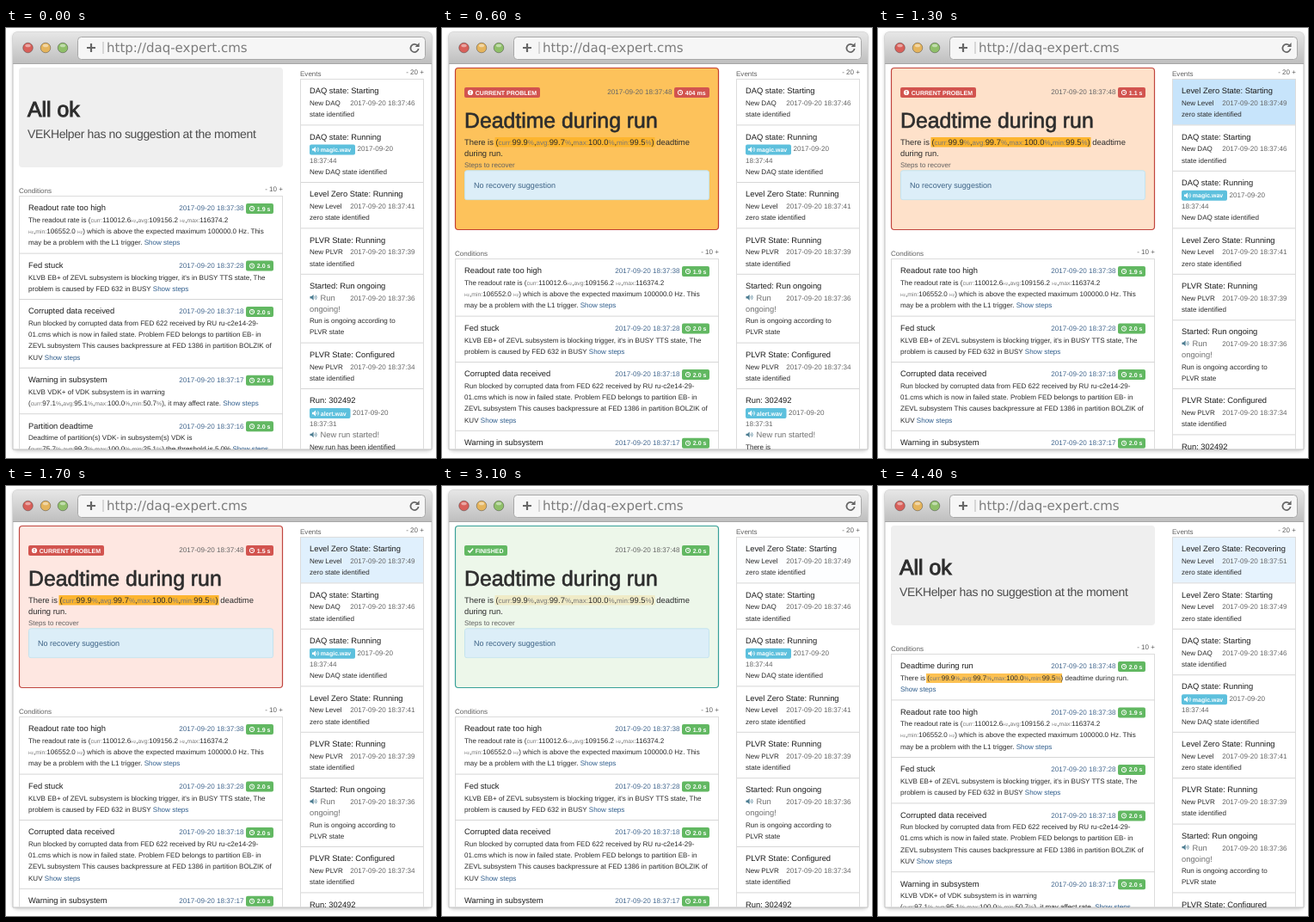
These frames come from a looping animation (500x500 px, 4.5 s). An HTML page:

```html
<!DOCTYPE html>
<html lang="en">
<head>
<meta charset="utf-8">
<title>Run monitor</title>
<style>
html, body { margin: 0; width: 100%; height: 100%; overflow: hidden; background: #fff; }
svg { display: block; width: 500px; height: 500px; }
text { font-family: "Liberation Sans", Arial, sans-serif; text-rendering: geometricPrecision; white-space: pre; }
.title { font-size: 9.35px; fill: #1c1c1c; }
.body { font-size: 8.05px; fill: #2a2a2a; }
.lead { font-size: 9.4px; fill: #2a2a2a; }
.note { font-size: 8.05px; fill: #606060; }
.sound { font-size: 9.35px; fill: #707070; }
.date { font-size: 8.1px; fill: #666; }
.blue { fill: #44688f; }
.label { font-size: 7px; font-weight: bold; fill: #fff; }
.heading { font-size: 24.8px; fill: #2d2d2d; stroke: #2d2d2d; stroke-width: .65px; }
.strong { stroke-width: 1px; }
.thin { font-size: 14px; letter-spacing: -.36px; fill: #4c4c4c; }
.hint { font-size: 9.05px; fill: #3c6285; }
.url { font: 15px "DejaVu Sans", sans-serif; fill: #7c7c7c; }
.unit { font-size: .85em; fill: #777; }
.hertz { font-size: .62em; fill: #777; }
.link { fill: #2f5d8c; }

/* One 4.5 s cycle: alarm 0.2 s, values 0.6 s, event 1.1 s, finished 2.2 s, event 3.5 s, calm 4.2 s */
.calm, .alarm, .early, .late, .running, .finished, .conditions, .extra, .rows, .details, .events, .before, .after {
  animation: 4.5s step-end infinite;
}
.calm { animation-name: calm; }
.alarm { animation-name: alarm; }
.early, .before { animation-name: early; }
.late, .after { animation-name: late; }
.running { animation-name: running; }
.finished { animation-name: finished; }
.conditions { animation-name: conditions; }
.extra { animation-name: extra; }
.rows { animation-name: rows; }
.details { animation-name: details; }
.events { animation-name: events; }
.panel { animation: tint 4.5s linear infinite, grow 4.5s step-end infinite; }
.mark-panel { animation: markPanel 4.5s linear infinite; }
.mark-row { animation: markRow 4.5s linear infinite; }
.glow1 { animation: glow1 4.5s linear infinite; }
.glow2 { animation: glow2 4.5s linear infinite; }
@keyframes calm { 0% { opacity: 1 } 4.444% { opacity: 0 } 93.333%, 100% { opacity: 1 } }
@keyframes alarm { 0% { opacity: 0 } 4.444% { opacity: 1 } 93.333%, 100% { opacity: 0 } }
@keyframes early { 0% { opacity: 1 } 13.333%, 100% { opacity: 0 } }
@keyframes late { 0% { opacity: 0 } 13.333%, 100% { opacity: 1 } }
@keyframes running { 0% { opacity: 1 } 48.888%, 100% { opacity: 0 } }
@keyframes finished { 0% { opacity: 0 } 48.888%, 100% { opacity: 1 } }
@keyframes conditions {
  0% { transform: translateY(0) } 4.444% { transform: translateY(60px) }
  13.333% { transform: translateY(73px) } 93.333%, 100% { transform: translateY(0) }
}
@keyframes extra { 0% { opacity: 0 } 93.333%, 100% { opacity: 1 } }
@keyframes rows { 0% { transform: translateY(0) } 93.333%, 100% { transform: translateY(53.4px) } }
@keyframes details { 0% { transform: translateY(0) } 13.333%, 100% { transform: translateY(13.3px) } }
@keyframes events {
  0% { transform: translateY(0) } 24.444% { transform: translateY(53.4px) }
  77.777%, 100% { transform: translateY(106.8px) }
}
@keyframes grow { 0% { height: 175px } 13.333%, 100% { height: 188px } }
@keyframes tint {
  0%, 6.667% { fill: #fdb52b; stroke: #c43c2c }
  32.2%, 48.88% { fill: #fee7e1; stroke: #c0453f }
  48.888%, 100% { fill: #edf7ea; stroke: #38a098 }
}
@keyframes markPanel { 0%, 48.888% { opacity: 1 } 53.333% { opacity: .88 } 73%, 100% { opacity: 0 } }
@keyframes markRow { 0%, 93.333% { opacity: 1 } 97.778% { opacity: .83 } 100% { opacity: .75 } }
@keyframes glow1 { 0%, 24.444% { opacity: 1 } 37.778% { opacity: .46 } 53.333% { opacity: .18 } 73%, 100% { opacity: 0 } }
@keyframes glow2 { 0%, 77.777% { opacity: 1 } 84.444% { opacity: .7 } 97.778% { opacity: .37 } 100% { opacity: .34 } }
</style>
</head>
<body>
<svg id="stage" viewBox="0 0 500 500"></svg>
<script>
const RED = '#d2544f', GREEN = '#62b862', CYAN = '#5dc0dd';

// Inline markup: ~unit~, ^hertz^ and [link]
const span = cls => `<tspan class="${cls}">$1</tspan>`;
const rich = s => s.replace(/~(.+?)~/g, span('unit')).replace(/\^(.+?)\^/g, span('hertz')).replace(/\[(.+?)\]/g, span('link'));
const text = (x, y, s, cls = 'body', more = '') => `<text x="${x}" y="${y}" class="${cls}" ${more}>${rich(s)}</text>`;
const rect = (x, y, w, h, fill, more = '') => `<rect x="${x}" y="${y}" width="${w}" height="${h}" fill="${fill}" ${more}/>`;
const group = (cls, ...parts) => `<g class="${cls}">${parts.join('')}</g>`;
const line = (x1, x2, y) => rect(x1, y, x2 - x1, 1, '#d6d6d6');
const stats = (...v) => '(' + ['curr', 'avg', 'max', 'min'].map((k, i) => `~${k}:~${v[i]}~%~`).join(',') + ')';
const rowHeight = lines => 27 + 13.2 * lines;

const icons = {
  clock: (x, y) => `<circle cx="${x}" cy="${y}" r="2.7" fill="none" stroke="#fff"/><path d="M${x} ${y - 1.6}v1.8h1.3" fill="none" stroke="#fff" stroke-width=".8"/>`,
  alert: (x, y) => `<circle cx="${x}" cy="${y}" r="3.1" fill="#fff"/>` + rect(x - .5, y - 2, 1, 2.4, RED) + rect(x - .5, y + .9, 1, 1, RED),
  check: (x, y) => `<path d="M${x - 2.7} ${y}l2 2.1 3.8-4.3" fill="none" stroke="#fff" stroke-width="1.6"/>`,
  speaker: (x, y, color = '#fff') => `<path d="M${x - 4} ${y - 1.2}h1.7l2.4-2.2v6.8l-2.4-2.2h-1.7z" fill="${color}"/>
    <path d="M${x + 1.3} ${y - 1.3}q1.2 1.3 0 2.6M${x + 2.6} ${y - 2.6}q2.4 2.6 0 5.2" fill="none" stroke="${color}" stroke-width=".8"/>`
};

// base is the text baseline the badge sits on
const badge = (x, base, w, color, icon, label) =>
  rect(x, base - 8.4, w, 12, color, 'rx="2"') + icons[icon](x + 7, base - 2.4) + text(x + 12.8, base + .1, label, 'label');

function stamp(base, time, label, color, cls = 'date') {
  const w = label.length > 5 ? 41 : 32;
  return text(308.4 - w, base, '2017-09-20 18:37:' + time, cls, 'text-anchor="end"') + badge(311 - w, base, w, color, 'clock', label);
}

function condition(top, title, time, label, lines) {
  return text(26, top + 17.4, title, 'title') + stamp(top + 17.4, time, label, GREEN, 'date blue') +
    lines.map((s, i) => text(26, top + 30.9 + 13.2 * i, s)).join('') + line(15, 322, top + rowHeight(lines.length));
}

const LEFT = [
  ['Readout rate too high', 38, '1.9 s', [
    'The readout rate is (~curr:~110012.6^Hz^,~avg:~109156.2 ^Hz^,~max:~116374.2',
    '^Hz^,~min:~106552.0 ^Hz^) which is above the expected maximum 100000.0 Hz. This',
    'may be a problem with the L1 trigger. [Show steps]']],
  ['Fed stuck', 28, '2.0 s', [
    "KLVB EB+ of ZEVL subsystem is blocking trigger, it's in BUSY TTS state, The",
    'problem is caused by FED 632 in BUSY [Show steps]']],
  ['Corrupted data received', 18, '2.0 s', [
    'Run blocked by corrupted data from FED 622 received by RU ru-c2e14-29-',
    '01.cms which is now in failed state. Problem FED belongs to partition EB- in',
    'ZEVL subsystem This causes backpressure at FED 1386 in partition BOLZIK of',
    'KUV [Show steps]']],
  ['Warning in subsystem', 17, '2.0 s', [
    'KLVB VDK+ of VDK subsystem is in warning',
    stats('97.1', '95.1', '100.0', '50.7') + ', it may affect rate. [Show steps]']],
  ['Partition deadtime', 16, '2.0 s', [
    'Deadtime of partition(s) VDK- in subsystem(s) VDK is',
    stats('75.7', '99.2', '100.0', '25.1') + ' the threshold is 5.0% [Show steps]']]
];

const at = (top, i) => top + 31 + 13.2 * i;
const plain = (a, b, sec) => top =>
  text(353, at(top, 0), a) + text(475.5, at(top, 0), '2017-09-20 18:37:' + sec, 'date', 'text-anchor="end"') + text(353, at(top, 1), b);
const level = sec => plain('New Level', 'zero state identified', sec);
const wav = (file, w, sec) => top =>
  badge(353, at(top, 0) + .4, w, CYAN, 'speaker', file) + text(355.5 + w, at(top, 0), '2017-09-20', 'date') +
  text(353, at(top, 1), '18:37:' + sec, 'date');
const spoken = (top, i, s) => icons.speaker(357.5, at(top, i) - 3.5, '#4d7d92') + text(365.5, at(top, i), s, 'sound');

// title, line count, body, optional highlight class
const RIGHT = [
  ['Level Zero State: Recovering', 2, level(51), 'glow2'],
  ['Level Zero State: Starting', 2, level(49), 'glow1'],
  ['DAQ state: Starting', 2, plain('New DAQ', 'state identified', 46)],
  ['DAQ state: Running', 3, top => wav('magic.wav', 53, 44)(top) + text(353, at(top, 2), 'New DAQ state identified')],
  ['Level Zero State: Running', 2, level(41)],
  ['PLVR State: Running', 2, plain('New PLVR', 'state identified', 39)],
  ['Started: Run ongoing', 4, top => spoken(top, 0, 'Run') +
    text(475.5, at(top, 0), '2017-09-20 18:37:36', 'date', 'text-anchor="end"') +
    text(353, at(top, 1), 'ongoing!', 'sound') +
    text(353, at(top, 2), 'Run is ongoing according to') + text(353, at(top, 3), 'PLVR state')],
  ['PLVR State: Configured', 2, plain('New PLVR', 'state identified', 34)],
  ['Run: 302492', 4, top => wav('alert.wav', 47.5, 31)(top) + spoken(top, 2, 'New run started!') +
    text(353, at(top, 3), 'New run has been identified', 'body before') + text(353, at(top, 3), 'There is', 'body after')]
];

function stack(top, items, draw, lines) {
  return items.map(item => {
    const out = draw(top, item);
    top += rowHeight(lines(item));
    return out;
  }).join('');
}

const eventRow = (top, [title, n, body, glow]) =>
  (glow ? rect(343, top, 142.5, rowHeight(n), '#bbdefb', `class="${glow}"`) : '') +
  text(353, top + 17.3, title, 'title') + body(top) + line(342.5, 486, top + rowHeight(n));

const browser = `
  <defs>
    <linearGradient id="bar" x2="0" y2="1"><stop stop-color="#e6e6e6"/><stop offset="1" stop-color="#bebebe"/></linearGradient>
    <filter id="soft" x="-5%" y="-5%" width="110%" height="110%"><feGaussianBlur stdDeviation="2"/></filter>
    <clipPath id="page"><rect x="9" y="42" width="485" height="448"/></clipPath>
    <clipPath id="feed"><rect x="342" y="59" width="145" height="431"/></clipPath>
  </defs>
  ${rect(8, 6, 487, 486, '#999', 'rx="5" filter="url(#soft)" opacity=".55"')}
  <path d="M8 490V10q0-5 5-5h477q5 0 5 5v480z" fill="#fff" stroke="#c2c2c2"/>
  <path d="M8 42V10q0-5 5-5h477q5 0 5 5v32z" fill="url(#bar)"/>
  ${rect(8, 41, 487, 1, '#a6a6a6')}
  ${[['#d8605a', 25.5], ['#e5b45c', 46], ['#8fbf69', 66]].map(([c, x]) =>
    `<circle cx="${x}" cy="23" r="5.8" fill="${c}" stroke="#000" stroke-opacity=".3"/>
     <ellipse cx="${x}" cy="20.5" rx="3.2" ry="1.8" fill="#fff" opacity=".45"/>`).join('')}
  ${rect(83.5, 10.5, 404, 26, '#f6f6f6', 'rx="4" stroke="#a8a8a8"')}
  <path d="M94 23h10M99 18v10" stroke="#666" stroke-width="2.2"/>
  ${rect(112.5, 16, 1, 14, '#b5b5b5')}
  ${text(117, 28, 'http://daq-expert.cms', 'url')}
  <path d="M478.3 20.2A4.6 4.6 0 1 0 479.6 24" fill="none" stroke="#666" stroke-width="1.8"/>
  <path d="M480.6 17v5h-5z" fill="#666"/>`;

const calm = group('calm',
  rect(15, 46, 307, 116, '#efefef', 'rx="4"'),
  text(25, 103, 'All ok', 'heading strong'),
  text(25, 128, 'VEKHelper has no suggestion at the moment', 'thin'));

const values = stats('99.9', '99.7', '100.0', '99.5');
const alarm = group('alarm',
  rect(15.5, 46.5, 306, 175, '#fdb52b', 'rx="3.5" class="panel" stroke-width="1.2"'),
  group('running', badge(26, 77.4, 88, RED, 'alert', 'CURRENT PROBLEM'), '<g id="timer"></g>'),
  group('finished', badge(26, 77.4, 50, GREEN, 'check', 'FINISHED'), stamp(77.4, 48, '2.0 s', GREEN)),
  text(26, 116, 'Deadtime during run', 'heading'),
  group('early', text(26, 136, 'There is 99.8% deadtime during run.', 'lead')),
  group('late',
    rect(61.5, 127, 186, 11.5, '#fdb52f', 'class="mark-panel"'),
    text(26, 136, `There is ${values} deadtime`, 'lead'),
    text(26, 149, 'during run.', 'lead')),
  group('details',
    text(26, 149, 'Steps to recover', 'note'),
    rect(26.5, 152.5, 284, 34, '#dceef8', 'rx="2.5" stroke="#c3e3ee"'),
    text(37, 173, 'No recovery suggestion', 'hint')));

const conditions = group('conditions',
  text(15, 192, 'Conditions', 'note'),
  text(322, 190, '- 10 +', 'note', 'text-anchor="end"'),
  rect(15.5, 195.5, 306, 400, 'none', 'stroke="#dcdcdc"'),
  group('extra',
    rect(56, 218, 158, 11, '#fdb52f', 'class="mark-row"'),
    condition(195, 'Deadtime during run', 48, '2.0 s', [`There is ${values} deadtime during run.`, '[Show steps]'])),
  group('rows', stack(195, LEFT, (top, row) => condition(top, ...row), row => row[3].length)));

const events = text(342, 55.5, 'Events', 'note') + text(486, 54, '- 20 +', 'note', 'text-anchor="end"') +
  `<g clip-path="url(#feed)">${group('events', stack(59 - 2 * rowHeight(2), RIGHT, eventRow, row => row[1]))}
   ${rect(342.5, 59.5, 143, 440, 'none', 'stroke="#dcdcdc"')}</g>`;

document.getElementById('stage').innerHTML =
  browser + `<g clip-path="url(#page)">${calm}${alarm}${conditions}${events}</g>`;

const timer = document.getElementById('timer');
let shown = '';
function tick() {
  const t = performance.now() % 4500;
  const ms = Math.min(2004, Math.max(4, Math.floor(t / 100) * 100 - 196));
  const label = ms < 1000 ? ms + ' ms' : (ms / 1000).toFixed(1) + ' s';
  if (label !== shown) timer.innerHTML = stamp(77.4, 48, shown = label, RED);
  requestAnimationFrame(tick);
}
tick();
</script>
</body>
</html>
```
